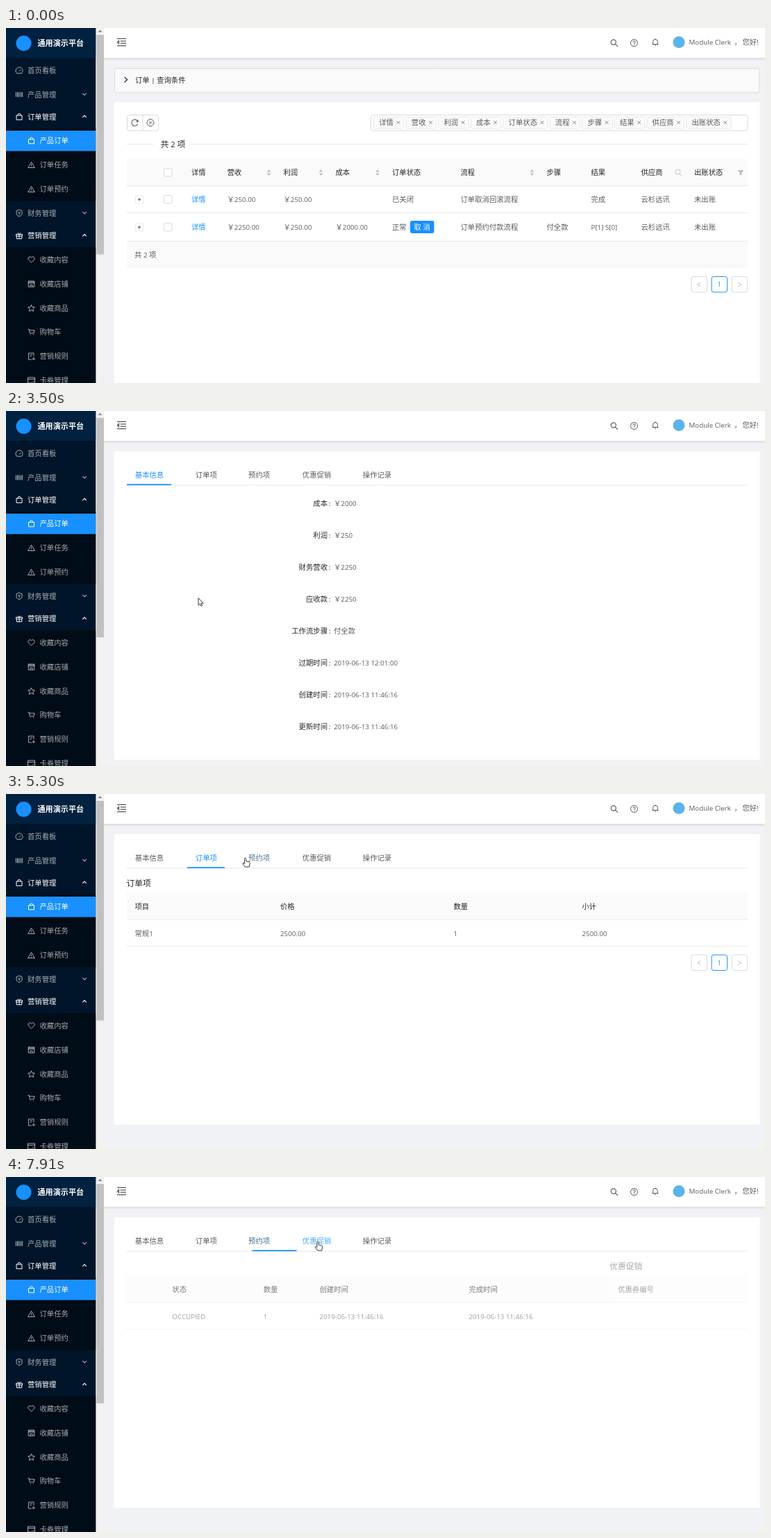
Animation, 1093 px wide and 512 px high, one loop 7990 ms. Source, as an HTML page with a canvas:

```html
<!DOCTYPE html>
<html lang="zh-CN">
<head>
<meta charset="utf-8">
<title>订单管理</title>
<style>
html, body { margin: 0; width: 100%; height: 100%; overflow: hidden; background: #f0f2f5; }
canvas { display: block; width: 1093px; height: 512px; }
</style>
</head>
<body>
<canvas id="stage"></canvas>
<script>
const W = 1093, H = 512, LOOP = 7990;
const canvas = document.getElementById('stage');
const ctx = canvas.getContext('2d');
const ratio = window.devicePixelRatio || 1;
canvas.width = W * ratio;
canvas.height = H * ratio;

const BLUE = '#1890ff', LIGHT = '#40a9ff', LINE = '#e8e8e8', EDGE = '#d9d9d9', PALE = '#fafafa';
const INK = 'rgba(0,0,0,.85)', TEXT = 'rgba(0,0,0,.65)', FAINT = 'rgba(0,0,0,.25)', DIM = 'rgba(255,255,255,.65)';
const CJK = '"Noto Sans CJK SC", "Noto Sans CJK", sans-serif';
const LATIN = '"Open Sans", "Noto Sans", sans-serif';

const clamp = v => Math.max(0, Math.min(1, v));
const lerp = (a, b, k) => a + (b - a) * k;

function bezier(x1, y1, x2, y2) {
  const at = (a, b, u) => 3 * a * u * (1 - u) ** 2 + 3 * b * u * u * (1 - u) + u ** 3;
  return x => {
    if (x <= 0) return 0;
    if (x >= 1) return 1;
    let lo = 0, hi = 1;
    for (let i = 0; i < 22; i++) {
      const mid = (lo + hi) / 2;
      if (at(x1, x2, mid) < x) lo = mid; else hi = mid;
    }
    return at(y1, y2, lo);
  };
}
const ease = bezier(.25, .1, .25, 1);
const inOut = bezier(.645, .045, .355, 1);

// ---------- drawing helpers ----------
function rect(x, y, w, h, fill) {
  ctx.fillStyle = fill;
  ctx.fillRect(x, y, w, h);
}

function box(x, y, w, h, r, fill, stroke) {
  ctx.beginPath();
  ctx.roundRect(x, y, w, h, r);
  if (fill) { ctx.fillStyle = fill; ctx.fill(); }
  if (stroke) { ctx.strokeStyle = stroke; ctx.lineWidth = 1; ctx.stroke(); }
}

function disc(x, y, r, fill) {
  ctx.beginPath();
  ctx.arc(x, y, r, 0, 7);
  ctx.fillStyle = fill;
  ctx.fill();
}

// Chinese and Latin runs get their own font; y is the middle of the line.
function text(s, x, y, color = TEXT, { size = 10.35, weight = 400, align = 'left' } = {}) {
  const runs = s.match(/[\u2e80-\uffef]+|[^\u2e80-\uffef]+/g).map(str => {
    const wide = str.charCodeAt(0) >= 0x2e80;
    const font = `${weight} ${wide ? size : size * .945}px ${wide ? CJK : LATIN}`;
    ctx.font = font;
    return { str, font, w: ctx.measureText(str).width };
  });
  const total = runs.reduce((sum, r) => sum + r.w, 0);
  if (align === 'right') x -= total;
  if (align === 'center') x -= total / 2;
  ctx.fillStyle = color;
  for (const r of runs) {
    ctx.font = r.font;
    ctx.fillText(r.str, x, y + size * .37);
    x += r.w;
  }
}

const ICONS = {
  gauge: 'M-3.4 3.8A5 5 0 1 1 3.4 3.8ZM0 1L2-1.5',
  bars: 'M-4.7-3.5V3.5M-2.7-3.5V3.5M-1.2-3.5V3.5M.8-3.5V3.5M2.8-3.5V3.5M4.6-3.5V3.5',
  bag: 'M-4-2H4V4.3H-4ZM-2-2V-2.6A2 2 0 0 1 2-2.6V-2',
  warn: 'M0-4.2L4.8 4H-4.8ZM0-1.3V1.3M0 2.2V3',
  shield: 'M0-4.8L4-3.3V1C4 3 1 4.3 0 4.8C-1 4.3-4 3-4 1V-3.3ZM-1.7-2L0 0L1.7-2M0 0V2.4',
  gift: 'M-4.5-2H4.5V.4H-4.5ZM-3.7.4V4.4H3.7V.4M0-2V4.4M-2.2-4.2L0-2L2.2-4.2',
  heart: 'M0 4.2L-4.2 0A2.5 2.5 0 0 1 0-3A2.5 2.5 0 0 1 4.2 0Z',
  shop: 'M-4.3-4H4.3V4.3H-4.3ZM-4.3-1H4.3M-1.5 4V1.5H1.5V4M-4.3-2.6H4.3',
  star: 'M0-4.8L1.4-1.6L4.8-1.2L2.3 1.1L3 4.5L0 2.8L-3 4.5L-2.3 1.1L-4.8-1.2L-1.4-1.6Z',
  cart: 'M-5-4H-3.4L-2.2 1.6H3.6L4.6-2.5H-3M-2 3.8H-1M2.6 3.8H3.6',
  rule: 'M3.5 0V-4.6H-4V4.6H.5M-2-2.2H1.5M-2 0H0M1.8 4.4L3.2 1.8L4.8 4.4Z',
  card: 'M-5-4H5V4H-5ZM-5-1.6H5M2 1.8H3.6',
  down: 'M-2.7-1.3L0 1.4L2.7-1.3',
  up: 'M-2.7 1.3L0-1.4L2.7 1.3',
  left: 'M2.4-3L-2.4 0L2.4 3',
  right: 'M-2.4-3L2.4 0L-2.4 3',
  open: 'M-1.8-3.8L2.2 0L-1.8 3.8',
  fold: 'M-6.5-5.2H6.5M-1.8-1.7H6.5M-1.8 1.7H6.5M-6.5 5.2H6.5M-4-2.2L-6.2 0L-4 2.2Z',
  find: 'M2.4-1A3.6 3.6 0 1 1-4.8-1A3.6 3.6 0 1 1 2.4-1ZM1.4 1.6L5 5.2',
  help: 'M5 0A5 5 0 1 1-5 0A5 5 0 1 1 5 0ZM-1.6-1.2A1.6 1.6 0 1 1 0 .4V1.3M0 2.2V3',
  bell: 'M-4.4 3H4.4M-3.3 3V-.8A3.3 3.3 0 0 1 3.3-.8V3M0-5V-4M-1 4.6H1',
  reload: 'M4.2-1.8A4.6 4.6 0 1 0 4.4 1.6M4.6-4V-1.4H2',
  clear: 'M5 0A5 5 0 1 1-5 0A5 5 0 1 1 5 0ZM-1.8-1.8L1.8 1.8M1.8-1.8L-1.8 1.8',
  cross: 'M-2.4-2.4L2.4 2.4M2.4-2.4L-2.4 2.4',
  plus: 'M-2.2 0H2.2M0-2.2V2.2'
};
const SOLID = {
  caretUp: 'M-3 1.6L0-1.8L3 1.6Z',
  caretDown: 'M-3-1.6L0 1.8L3-1.6Z',
  filter: 'M-4.3-3.6H4.3L1.4 .6V3.8H-1.4V.6Z'
};
const ARROW = 'M0 0V10.4L2.4 8.2L4 11.6L5.6 10.9L4.1 7.5H7.2Z';
const HAND = 'M-1.1 6.5V.9A1.1 1.1 0 0 1 1.1 .9V4.4L5.4 5.3Q6.8 5.8 6.6 7.2L5.8 12.6H-.2L-3.4 8.4Q-4 6.9-2.6 6.7L-1.1 8Z';

function icon(name, x, y, color, width = 1) {
  ctx.save();
  ctx.translate(x, y);
  if (SOLID[name]) {
    ctx.fillStyle = color;
    ctx.fill(new Path2D(SOLID[name]));
  } else {
    ctx.strokeStyle = color;
    ctx.lineWidth = width;
    ctx.stroke(new Path2D(ICONS[name]));
  }
  ctx.restore();
}

// ---------- frame of the app ----------
const MENU = [
  ['gauge', '首页看板', 61.5], ['bars', '产品管理', 96, 'down'], ['bag', '订单管理', 128, 'up'],
  ['bag', '产品订单', 162.5, 'on'], ['warn', '订单任务', 197.5, 'sub'], ['warn', '订单预约', 232.5, 'sub'],
  ['shield', '财务管理', 267, 'down'], ['gift', '营销管理', 299.5, 'up'],
  ['heart', '收藏内容', 334, 'sub'], ['shop', '收藏店铺', 369, 'sub'], ['star', '收藏商品', 404, 'sub'],
  ['cart', '购物车', 438.5, 'sub'], ['rule', '营销规则', 473.5, 'sub'], ['card', '卡券管理', 508, 'sub']
];

function sidebar() {
  rect(0, 0, 129.5, H, '#001529');
  rect(0, 0, 129.5, 43, '#002140');
  rect(0, 145, 129.5, 104.5, '#000c17');
  rect(0, 316, 129.5, 196, '#000c17');
  rect(0, 148, 129.5, 29.5, BLUE);
  disc(25.5, 22, 11, BLUE);
  text('通用演示平台', 45.5, 22, '#fff', { size: 11.1, weight: 700 });
  for (const [name, label, y, kind] of MENU) {
    const deep = kind === 'sub' || kind === 'on';
    const color = kind === 'on' || kind === 'up' ? '#fff' : DIM;
    icon(name, deep ? 36.5 : 19, y, color);
    text(label, deep ? 48.5 : 31, y, color);
    if (kind === 'up' || kind === 'down') icon(kind, 113, y - .5, color, 1.2);
  }
  rect(129.5, 0, 11.5, H, '#f1f1f1');
  rect(130.5, 10, 10.5, 316.5, '#c1c1c1');
  icon('caretUp', 135.5, 4.5, '#8a8a8a');
}

function header() {
  ctx.save();
  ctx.shadowColor = 'rgba(0,21,41,.16)';
  ctx.shadowBlur = 4 * ratio;
  ctx.shadowOffsetY = ratio;
  rect(141, 0, W - 141, 43, '#fff');
  ctx.restore();
  icon('fold', 166.5, 20.5, TEXT, 1.2);
  icon('find', 876, 21.5, TEXT, 1.2);
  icon('help', 904.5, 21.5, TEXT);
  icon('bell', 935, 20.5, TEXT);
  disc(969, 20.5, 8.5, '#5ab4ec');
  text('Module Clerk', 983.5, 20.5);
  text('，', 1048.5, 20.5);
  text('您好!', 1060.5, 20.5);
}

function pager(x, y) {
  for (let i = 0; i < 3; i++) {
    const on = i === 1, left = x + i * 29.1;
    box(left + .5, y + .5, 22.5, 22.5, 3, '#fff', on ? BLUE : EDGE);
    if (on) text('1', left + 11.7, y + 11.5, BLUE, { align: 'center', weight: 500 });
    else icon(i ? 'right' : 'left', left + 11.7, y + 12, FAINT);
  }
}

// ---------- order list ----------
const COLS = { 详情: 267, 营收: 318.5, 利润: 399.5, 成本: 474.5, 订单状态: 556, 流程: 654.5, 步骤: 778.5, 结果: 842.5, 供应商: 914.5, 出账状态: 991 };
const COL_X = Object.values(COLS);
const ROWS = [
  [247, '详情', '￥250.00', '￥250.00', '', '已关闭', '订单取消回滚流程', '', '完成', '云杉远讯', '未出账'],
  [287, '详情', '￥2250.00', '￥250.00', '￥2000.00', '正常', '订单预约付款流程', '付全款', 'P[1] S[0]', '云杉远讯', '未出账']
];

function list(t) {
  box(156.5, 58.5, 928.5, 34.5, 3, PALE, EDGE);
  icon('open', 172.5, 74.5, INK, 1.2);
  text('订单 | 查询条件', 186, 75.5, INK);
  rect(156, 107, 929.5, 405, '#fff');

  box(174.5, 125.5, 45, 22.5, 3, '#fff', EDGE);
  rect(196.5, 125.5, 1, 22.5, EDGE);
  icon('reload', 185.5, 136.5, TEXT, 1.1);
  icon('clear', 208, 136.5, TEXT);

  box(525.5, 125.5, 542.5, 22.5, 3, '#fff', EDGE);
  let x = 529.5;
  for (const name of Object.keys(COLS)) {
    const w = 23 + 10.3 * name.length;
    box(x, 128.5, w, 16.5, 2, PALE, LINE);
    text(name, x + 7.7, 136.5);
    icon('cross', x + w - 8.2, 136.3, 'rgba(0,0,0,.45)');
    x += w + 3;
  }

  rect(174, 167, 39, 1, LINE);
  rect(266, 167, 802, 1, LINE);
  text('共 2 项', 240.5, 167.5, INK, { size: 11.8, weight: 500, align: 'center' });

  rect(174, 189, 894, 38, PALE);
  rect(174, 267, 894, 40, `rgba(230,247,255,${ease((t - 1680) / 300)})`);
  rect(174, 308, 894, 38.5, PALE);
  for (const y of [227, 266, 307]) rect(174, y, 894, 1, LINE);
  for (const name in COLS) text(name, COLS[name], 208.5, INK);
  for (const cx of [378.5, 453.5, 535, 757.5]) {
    icon('caretUp', cx, 205.8, '#bfbfbf');
    icon('caretDown', cx, 211.2, '#bfbfbf');
  }
  icon('find', 968.5, 208.5, '#bfbfbf');
  icon('filter', 1058, 208.5, '#bfbfbf');
  for (const y of [208, 247, 287]) box(227.5, y - 5.5, 11.5, 11.5, 2, '#fff', EDGE);

  ROWS.forEach(([y, ...cells], r) => {
    box(186.5, y - 5.5, 11, 11.5, 1, '#fff', LINE);
    icon('plus', 192, y + .3, TEXT);
    cells.forEach((cell, i) => {
      if (!cell) return;
      text(cell, COL_X[i], y, i ? TEXT : r && t > 2135 ? LIGHT : BLUE);
    });
  });
  rect(580, 282.5, 1, 10, EDGE);
  box(582, 278, 34.5, 18, 3, BLUE);
  text('取 消', 599.2, 287, '#fff', { align: 'center' });
  text('共 2 项', 185, 327.5);
  pager(986.5, 358);
}

// ---------- order details ----------
const SWITCH = [4340, 6080, 7800];
const GREY = [89, 89, 89], ACTIVE = [24, 144, 255], HOVER = [64, 169, 255];
const TABS = [
  { name: '基本信息', x: 174, w: 64, color: ACTIVE, fades: [[4340, GREY]] },
  { name: '订单项', x: 261, w: 54, color: GREY, fades: [[4130, HOVER], [4750, ACTIVE], [6080, GREY]] },
  { name: '预约项', x: 337.3, w: 54, color: GREY, fades: [[5240, HOVER], [6230, ACTIVE], [7800, GREY]] },
  { name: '优惠促销', x: 415, w: 64, color: GREY, fades: [[6480, HOVER]] },
  { name: '操作记录', x: 502, w: 64, color: GREY, fades: [] }
];
const INFO = [
  ['成本', '￥2000'], ['利润', '￥250'], ['财务营收', '￥2250'], ['应收款', '￥2250'], ['工作流步骤', '付全款'],
  ['过期时间', '2019-06-13 12:01:00'], ['创建时间', '2019-06-13 11:46:16'], ['更新时间', '2019-06-13 11:46:16']
];
const STAMP = '2019-06-13 11:46:16';
const TABLES = {
  1: [[185.5, '项目', '常规1'], [395, '价格', '2500.00'], [644.5, '数量', '1'], [829.5, '小计', '2500.00']],
  2: [[185.5, '班期', '[单日多班]201906141400'], [437.7, '状态', 'OCCUPIED'], [569, '数量', '1'], [649.8, '创建时间', STAMP], [864.8, '完成时间', STAMP]],
  3: [[185.5, '优惠券编号', '']]
};

function tabColor(tab, t) {
  let c = tab.color;
  for (const [at, next] of tab.fades) {
    const k = ease((t - at) / 300);
    c = c.map((v, i) => lerp(v, next[i], k));
  }
  return `rgb(${c.map(Math.round)})`;
}

function pane(i) {
  if (i === 0) {
    INFO.forEach(([label, value], n) => {
      const y = 133.5 + n * 45.9;
      text(label, 463, y, INK, { align: 'right' });
      text(':', 464.8, y, INK);
      text(value, 472, y);
    });
    return;
  }
  text(TABS[i].name, 173.5, 128.5, INK, { size: 11.8 });
  rect(174, 142.5, 894, 38, PALE);
  rect(174, 180.5, 894, 1, LINE);
  rect(174, 219, 894, 1, LINE);
  for (const [x, head, value] of TABLES[i]) {
    text(head, x, 162, INK);
    if (value) text(value, x, 201);
  }
  if (i < 3) pager(986.5, 231.5);
}

function details(t) {
  rect(156, 58, 929.5, t < SWITCH[0] ? 445 : 419, '#fff');
  rect(174, 106.5, 894, 1, LINE);
  const pos = SWITCH.reduce((sum, s) => sum + inOut((t - s) / 300), 0);
  const active = SWITCH.filter(s => t >= s).length;
  const from = TABS[Math.floor(pos)], to = TABS[Math.floor(pos) + 1];
  rect(lerp(from.x, to.x, pos % 1), 105.3, TABS[active].w, 1.8, BLUE);
  for (const tab of TABS) text(tab.name, tab.x + 11.8, 92.5, tabColor(tab, t));

  ctx.save();
  ctx.beginPath();
  ctx.rect(173.5, 109, 894.5, active === 3 ? 115 : 394);
  ctx.clip();
  for (let i = 0; i < 4; i++) {
    const shown = i ? ease((t - SWITCH[i - 1]) / 450) : 1;
    const gone = i < 3 ? ease((t - SWITCH[i]) / 450) : 0;
    const alpha = shown * (1 - gone);
    if (alpha <= 0 || Math.abs(i - pos) >= 1) continue;
    ctx.save();
    ctx.globalAlpha = alpha;
    ctx.translate((i - pos) * 894, 0);
    pane(i);
    ctx.restore();
  }
  ctx.restore();
}

// ---------- pointer ----------
const OPEN = 2640;
const PATH = [
  [540, 1009, 505], [1310, 556, 341], [1700, 400, 305], [2170, 277.5, 287], [2570, 277.5, 287], [2640, 277, 285],
  [3430, 277, 285], [3500, 277, 270], [3800, 273, 190], [4150, 269, 92], [4290, 274, 93], [4700, 274, 93],
  [5130, 334, 93], [5300, 344.5, 92.5], [5570, 362, 94], [6050, 362, 94], [6350, 405.5, 92], [6820, 443, 94], [7130, 449, 93.5]
];

function pointer(t) {
  if (t < PATH[0][0]) return;
  const n = PATH.findIndex(p => p[0] > t);
  const b = PATH[n < 0 ? PATH.length - 1 : n], a = n < 0 ? b : PATH[n - 1];
  const k = a === b ? 0 : clamp((t - a[0]) / (b[0] - a[0]));
  const x = lerp(a[1], b[1], k), y = lerp(a[2], b[2], k);
  const hand = t < OPEN ? x < 288 : y < 106 && TABS.some(tab => x >= tab.x && x <= tab.x + tab.w);
  const shape = new Path2D(hand ? HAND : ARROW);
  ctx.save();
  ctx.translate(x, y);
  ctx.fillStyle = '#fff';
  ctx.fill(shape);
  ctx.strokeStyle = '#222';
  ctx.lineWidth = .9;
  ctx.stroke(shape);
  ctx.restore();
}

const start = performance.now();
function draw() {
  const t = (performance.now() - start) % LOOP;
  ctx.setTransform(ratio, 0, 0, ratio, 0, 0);
  rect(0, 0, W, H, '#f0f2f5');
  header();
  sidebar();
  if (t < OPEN) list(t); else details(t);
  pointer(t);
  requestAnimationFrame(draw);
}
draw();
</script>
</body>
</html>
```
